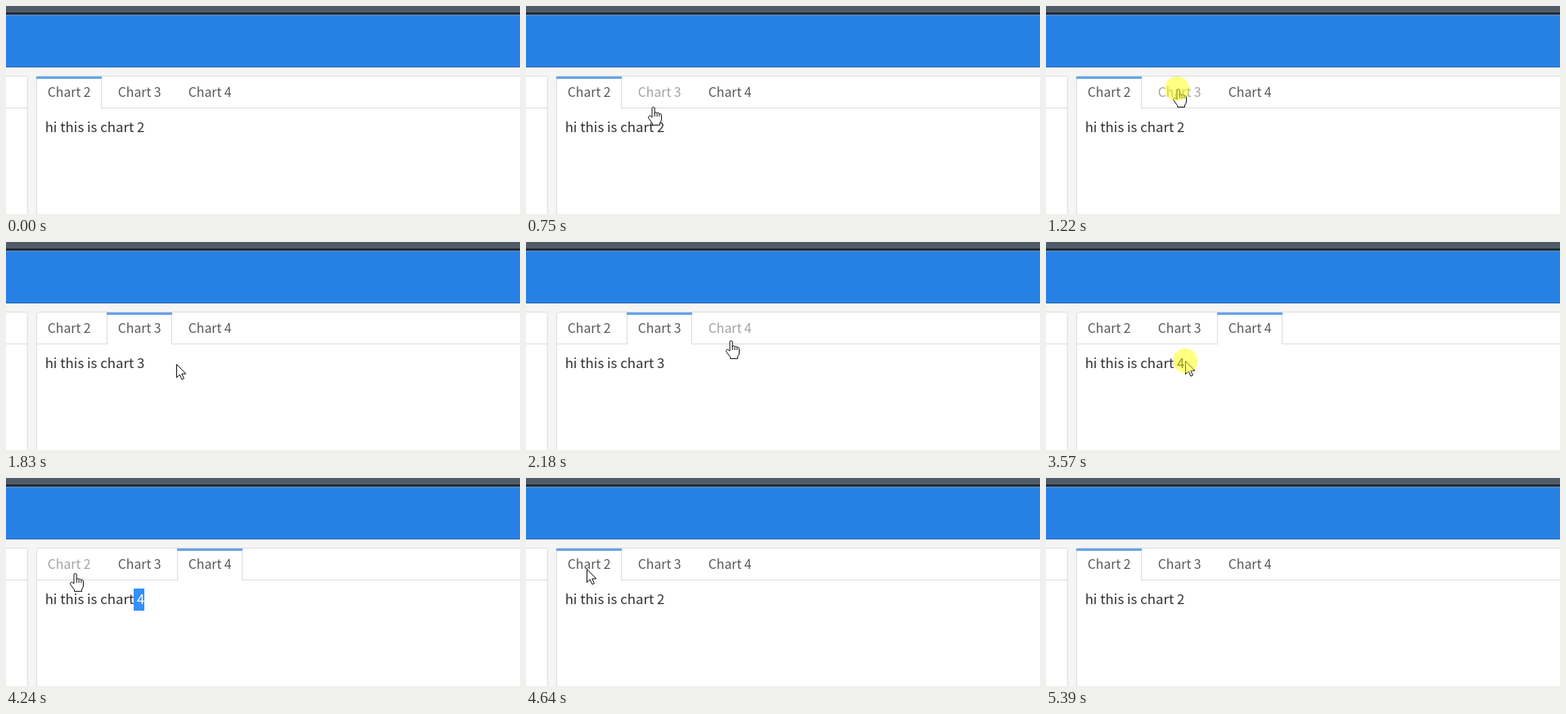
An HTML page for the animation above (6180 ms loop, 628 px wide and 254 px high).

```html
<!DOCTYPE html>
<html lang="en">
<head>
<meta charset="utf-8">
<title>Tabs</title>
<style>
  html, body { margin: 0; width: 100%; height: 100%; overflow: hidden; background: #f5f5f5; }
  svg { display: block; }
  text { font-family: "Noto Sans CJK JP", "Noto Sans CJK SC", "Noto Sans CJK", "Noto Sans", sans-serif; white-space: pre; }
  .tab { font-size: 15.75px; fill: #595959; }
  .hover { fill: #a3a3a3; }
  .body { font-size: 16.8px; fill: #333; }
  .line { fill: none; stroke: #ddd; }
  .cursor { fill: #fff; stroke: #111; stroke-linejoin: round; }
</style>
</head>
<body>
<svg width="628" height="254" viewBox="0 0 628 254">
  <rect width="628" height="11" fill="#4f5b66"/>
  <rect y="8" width="628" height="2" fill="#17222d"/>
  <rect y="11" width="628" height="64" fill="#2780e3"/>
  <rect y="11" width="628" height="1" fill="#4a90dc"/>
  <rect y="74" width="628" height="1" fill="#1f68b9"/>

  <rect x="-9.5" y="85.5" width="36" height="200" rx="3" fill="#fff" stroke="#ddd"/>
  <path class="line" d="M0 124.5H26"/>
  <rect x="37.5" y="85.5" width="640" height="200" rx="3" fill="#fff" stroke="#ddd"/>
  <path class="line" d="M38 124.5H628"/>

  <g id="active">
    <rect y="86" width="80" height="39" fill="#fff"/>
    <path class="line" d="M.5 86V125M79.5 86V125"/>
    <rect y="86" width="80" height="3" fill="#68a4e8"/>
  </g>
  <g id="labels"></g>

  <rect id="selection" x="156" y="135" width="13" height="27" fill="#3390ff"/>
  <text class="body" x="47.7" y="154">hi this is chart<tspan id="number"></tspan></text>

  <path id="arrow" class="cursor" d="M.5 .5V16.5L4.2 13L6.9 18.8L9.4 17.7L6.8 12H11.8Z"/>
  <path id="hand" class="cursor" d="M0 13V2Q0 .6 1.6 .6T3.2 2V8Q3.3 6.7 4.7 6.8T6.1 8.3Q6.4 7.2 7.6 7.4T8.9 9Q9.3 8.2 10.4 8.6T11.5 10.3V15Q11.5 18 9.6 20V22.4H.6V20.5L-4.1 14.2Q-5.2 12.2 -3.6 11.4T-1.2 12ZM3.2 8V12M6.1 8.5V12M8.9 9.2V12"/>
  <circle id="press" r="15" fill="#ff0" fill-opacity=".49"/>
</svg>
<script>
const LOOP = 6180, STEP = 67.5, TAB_X = 37, PITCH = 86, TAB_W = 80;
const $ = id => document.getElementById(id);

const linear = f => f;
const easeIn = f => f ** 2;
const easeOut = f => 1 - (1 - f) ** 2.7;

// The pointer travels from stop to stop; "via" bends the path.
const entry = [457, 240];
const moves = [
  { at: 260, lasts: 588, via: [105, 155], to: [160, 101] },
  { at: 1480, lasts: 740, via: [217, 196], to: [256, 105] },
  { at: 3095, lasts: 200, to: [170, 145] },
  { at: 3570, lasts: 135, to: [154, 158] },
  { at: 3900, lasts: 600, to: [74, 111], ease: easeOut },
  { at: 4900, lasts: 405, to: [486, 241], ease: easeIn },
];

const labels = [2, 3, 4].map((n, i) => {
  const label = document.createElementNS("http://www.w3.org/2000/svg", "text");
  label.setAttribute("x", TAB_X + PITCH * i + 13.8);
  label.setAttribute("y", 111);
  label.textContent = "Chart " + n;
  return $("labels").appendChild(label);
});

const between = (t, from, to) => t >= from && t < to;
const show = (el, on) => el.setAttribute("visibility", on ? "visible" : "hidden");
const place = (el, x, y) => el.setAttribute("transform", `translate(${x} ${y})`);

function pointerAt(t) {
  if (!between(t, 260, 5390)) return null;
  const i = moves.findLastIndex(m => m.at <= t);
  const { at, lasts, to, via, ease = linear } = moves[i];
  const from = i ? moves[i - 1].to : entry;
  const elapsed = Math.floor((t - at) / STEP) * STEP;
  const p = ease(Math.min(1, elapsed / lasts));
  return from.map((a, k) => {
    const b = to[k], mid = via ? via[k] : (a + b) / 2;
    return Math.round(a * (1 - p) ** 2 + 2 * mid * p * (1 - p) + b * p ** 2);
  });
}

function tabUnder([x, y]) {
  const i = Math.floor((x - TAB_X) / PITCH);
  return between(y, 86, 124) && i < 3 && (x - TAB_X) % PITCH < TAB_W ? i : -1;
}

function draw(t) {
  const tab = between(t, 1350, 2970) ? 1 : between(t, 2970, 4640) ? 2 : 0;
  const pointer = pointerAt(t);
  const under = pointer ? tabUnder(pointer) : -1;
  const hover = under === tab ? -1 : under;
  const selected = between(t, 3640, 4640);
  const pressed = between(t, 1220, 1350) || between(t, 2840, 2970) || between(t, 3500, 3970);

  place($("active"), TAB_X + PITCH * tab, 0);
  labels.forEach((label, i) => label.setAttribute("class", i === hover ? "tab hover" : "tab"));
  $("number").textContent = " " + (tab + 2);
  $("number").style.fill = selected ? "#fff" : "";
  show($("selection"), selected);

  show($("press"), pressed);
  show($("arrow"), pointer && hover < 0);
  show($("hand"), pointer && hover >= 0);
  if (pointer) for (const id of ["press", "arrow", "hand"]) place($(id), ...pointer);
}

function tick() {
  draw(performance.now() % LOOP);
  requestAnimationFrame(tick);
}
tick();
</script>
</body>
</html>
```
